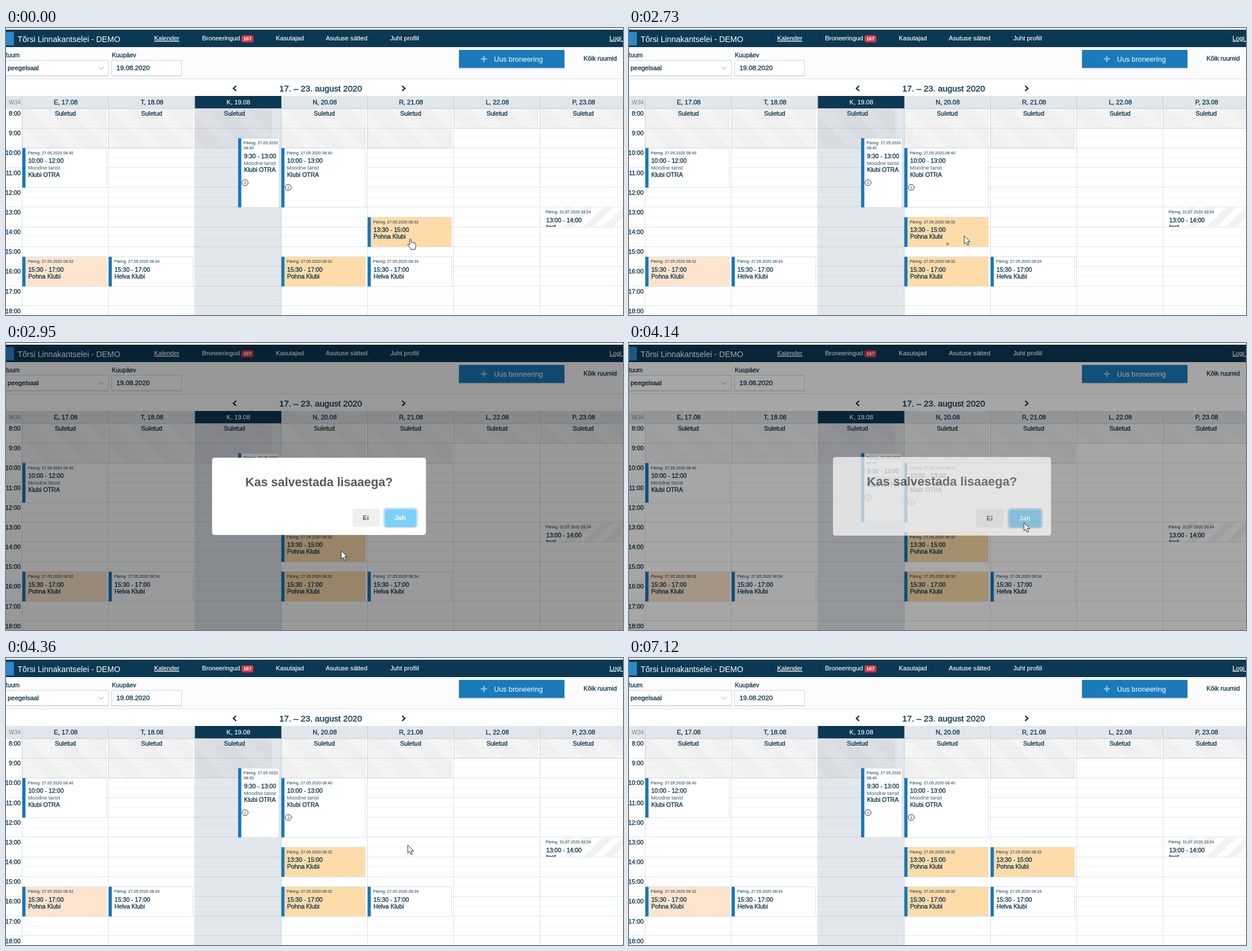
These frames come from a looping animation (1095 by 511 pixels, 7890 ms). An HTML page:

```html
<!DOCTYPE html>
<html lang="et">
<head>
<meta charset="utf-8">
<title>Kalender</title>
<style>
html, body { margin: 0; width: 100%; height: 100%; overflow: hidden; background: #fff; }
svg { display: block; width: 100%; height: 100%; }
text { font-family: "Liberation Sans", Arial, sans-serif; fill: #0c3550; white-space: pre; }
.m { stroke: #0c3550; stroke-width: .35; }
.w { fill: #fff; stroke: #fff; stroke-width: .15; }
.u { text-decoration: underline; }
.mid { text-anchor: middle; }
.end { text-anchor: end; }
.soft { fill: #3d5a6e; }
.b { font-weight: bold; }
</style>
</head>
<body>
<svg id="stage" viewBox="0 0 1095 511" preserveAspectRatio="none"></svg>
<script>
const LOOP = 7890, HOUR = 35.18, TOP = 143.5, COL = 153.2, LEFT = 29;
const BLUE = '#1677bb', ORANGE = '#fddca9';
const colX = i => LEFT + i * COL;
const hourY = h => TOP + (h - 8) * HOUR;

const rect = (x, y, w, h, fill, more = '') =>
  `<rect x="${x}" y="${y}" width="${w}" height="${h}" fill="${fill}" ${more}/>`;
const text = (x, y, size, str, cls = '', more = '') =>
  `<text x="${x}" y="${y}" font-size="${size}" class="${cls}" ${more}>${str}</text>`;
const line = (d, color, width = 1) =>
  `<path d="${d}" fill="none" stroke="${color}" stroke-width="${width}"/>`;

function stripes(id, size, angle, a, b) {
  return `<pattern id="${id}" width="${size}" height="${size}" patternUnits="userSpaceOnUse"
    patternTransform="rotate(${angle})">${rect(0, 0, size, size, a)}${rect(0, 0, size / 2, size, b)}</pattern>`;
}

function topBar() {
  return rect(0, 0, 1095, 3, '#f7f9f6') + rect(0, 3, 1095, 31, '#0b3953') +
    rect(-10, 7, 24, 24, '#2b88c6') +
    text(20.5, 24.5, 14.27, 'Tõrsi Linnakantselei - DEMO', 'w', 'style="stroke:none"') +
    [[263, 'Kalender', 'w u'], [348, 'Broneeringud', 'w'], [479, 'Kasutajad', 'w'],
     [567.5, 'Asutuse sätted', 'w'], [682, 'Juht profiil', 'w'], [1071, 'Logi välja', 'w u']]
      .map(([x, s, c]) => text(x, 22, 11.2, s, c)).join('') +
    rect(418, 13, 21, 12.5, '#dc3545', 'rx="3"') +
    text(428.5, 22.4, 8.6, '167', 'w b mid');
}

function filters() {
  const box = (x, w) => rect(x, 58.5, w, 28, '#e6e8ea') +
    rect(x + .5, 57.5, w - 1, 27, '#fff', 'stroke="#cfd4d8"');
  return rect(0, 34, 1095, 56.5, '#fcfcfc') + rect(0, 90, 1095, 1, '#dce0e4') +
    text(-5, 52, 10.9, 'Ruum', 'm') + text(188, 52, 10.9, 'Kuupäev', 'm') +
    box(-6, 188) + box(187, 125) +
    text(3, 75, 11.4, 'peegelsaal', 'm') + text(196, 75, 11.8, '19.08.2020', 'm') +
    line('M165 69.5l4 4 4-4', '#8296a2') +
    rect(803, 40, 189, 33, '#d9dfe4', 'rx="1"') + rect(804, 39, 187, 32, '#1a7aba') +
    line('M848 49.5v11M842.5 55h11', '#8dc0e2', 2.6) +
    text(866, 60, 12.7, 'Uus broneering', 'w', 'style="stroke:none"') +
    text(1025, 58, 11.2, 'Kõik ruumid', 'm') +
    line('M408.5 103l-5 4.5 5 4.5M703 103l5 4.5-5 4.5', '#0a1c28', 2.1) +
    text(558.5, 112.7, 15.2, '17. – 23. august 2020', 'm mid');
}

function grid() {
  let s = rect(0, 121, 1095, 22.5, '#e1e6ea') + rect(colX(2), TOP, COL, 370, '#e2e7ec');
  for (let i = 0; i < 7; i++) {
    const now = i === 2, h = (i < 5 ? 2 : 1) * HOUR;
    s += rect(colX(i), TOP, now ? 137 : 149, h, now ? 'url(#shutNow)' : 'url(#shut)',
      now ? '' : 'stroke="#e4e4e4"');
  }
  for (let k = 0; k < 22; k++) {
    const y = Math.round(TOP + k * HOUR / 2) - .5;
    s += line(`M${k % 2 ? LEFT : 0} ${y}H1095`, k % 2 ? 'rgba(60,70,80,.06)' : 'rgba(60,70,80,.14)');
  }
  for (let i = 0; i < 7; i++)
    s += line(`M${Math.round(colX(i)) - .5} 121V511`, 'rgba(60,80,95,.17)');
  s += rect(colX(2), 121, COL, 22, '#0b3953');
  ['E, 17.08', 'T, 18.08', 'K, 19.08', 'N, 20.08', 'R, 21.08', 'L, 22.08', 'P, 23.08'].forEach((d, i) => {
    s += text(colX(i) + 77, 136.3, 11.3, d, i === 2 ? 'w mid' : 'm mid');
    s += text(i === 2 ? 405.5 : colX(i) + 76.3, 155.7, 11, 'Suletud', 'm mid');
  });
  s += text(26, 136, 10.2, 'W34', 'end', 'style="fill:#75838d"');
  for (let h = 8; h <= 18; h++) s += text(26, hourY(h) + 12.5, 10.75, h + ':00', 'm end');
  return s;
}

// rows: small request line(s), time span, optional activity, club
function booking(x, from, to, o) {
  const y = hourY(from), h = hourY(to) - y, w = o.w || 149, span = t =>
    Math.floor(t) + (t % 1 ? ':30' : ':00');
  let s = rect(x, y, w, h, o.fill || '#fff', 'stroke="#d9dde0" stroke-width=".8"') +
    rect(x, y, 5.6, h, BLUE), ty = y + 10.7;
  o.at.forEach((a, i) => { s += text(x + 9.7, ty + i * 9, 7.2, a); });
  ty += 15.7 + (o.at.length - 1) * 9;
  s += text(x + 10.4, ty, 10.69, `${span(from)} - ${span(to)}`, 'm');
  if (o.act) s += text(x + 10, ty += 12.2, 9.4, o.act, 'soft');
  s += text(x + 10.4, ty += 12.1, 10.67, o.club, 'm');
  if (o.info) {
    const cx = x + 12.3, cy = ty + 19.4;
    s += `<circle cx="${cx}" cy="${cy}" r="5.4" fill="none" stroke="#26343e"/>` +
      line(`M${cx} ${cy - 1}v4M${cx} ${cy - 3.2}v1.2`, '#26343e');
  }
  return s;
}

function bookings() {
  const early = 'Päring: 27.05.2020 08:40', late = 'Päring: 27.05.2020 08:34', mid = 'Päring: 27.05.2020 08:32';
  const dance = { act: 'Moodne tanst', club: 'Klubi OTRA' };
  const pohna = { at: [mid], club: 'Pohna Klubi', fill: ORANGE };
  const helva = { at: [late], club: 'Helva Klubi' };
  const [x0, x1, , x3, x4, , x6] = Array.from({ length: 7 }, (_, i) => colX(i));
  const yP = hourY(13);
  return booking(x0, 10, 12, { ...dance, at: [early] }) +
    booking(412, 9.5, 13, { ...dance, at: ['Päring: 27.05.2020', '08:40'], w: 72.5, info: true }) +
    booking(x3, 10, 13, { ...dance, at: [early], info: true }) +
    booking(x0, 15.5, 17, { ...pohna, fill: '#fde5cd' }) +
    booking(x3, 15.5, 17, pohna) + booking(x1, 15.5, 17, helva) + booking(x4, 15.5, 17, helva) +
    rect(x6, yP, 160, 34.5, 'url(#draft)') + rect(x6, yP, 42, 34.5, '#fff', 'opacity=".85"') +
    text(957.5, yP + 10.7, 7.2, 'Päring: 31.07.2020 10:24') +
    text(958.7, yP + 26.3, 10.69, '13:00 - 14:00', 'm') +
    `<g clip-path="url(#cut)">${text(958.7, yP + 38.4, 10.67, 'test', 'm')}</g>` +
    `<g id="thu">${booking(x3, 13.5, 15, pohna)}</g><g id="fri">${booking(x4, 13.5, 15, pohna)}</g>` +
    `<g id="grip">${line('M562.8 383.5h5M562.8 385.8h5', '#24465c', .9)}</g>`;
}

function dialog() {
  return `<g id="modal">${rect(362, 203, 387, 140, '#fff', 'rx="4.5"')}` +
    text(555.5, 254.3, 22.1, 'Kas salvestada lisaaega?', 'b mid', 'style="fill:#595959"') +
    rect(616, 295.5, 49, 33, '#efefef', 'rx="4"') +
    text(640, 316, 11.8, 'Ei', 'b mid', 'style="fill:#555"') +
    rect(673, 295, 60, 34, '#fff', 'rx="5" stroke="#b3d3ea" stroke-width="2"') +
    rect(674.5, 296.5, 57, 31.5, '#7cd1f9', 'rx="4" id="yes"') +
    text(702.5, 316, 11.8, 'Jah', 'b w mid') + '</g>';
}

const ink = 'fill="#fff" stroke="#222b33" stroke-width="1" stroke-linejoin="round"';
const stage = document.getElementById('stage');
stage.innerHTML = `<defs>${stripes('shut', 50, -45, '#f4f4f4', '#f0f0f0')}
  ${stripes('shutNow', 50, -45, '#dce0e4', '#d8dce0')}${stripes('draft', 25, 45, '#fff', '#f2f2f2')}
  <clipPath id="cut">${rect(948, 320, 147, 34, '#000')}</clipPath></defs>` +
  rect(0, 0, 1095, 511, '#fff') + topBar() + filters() + grid() + bookings() +
  rect(0, 3, 1095, 508, '#000', 'id="dim"') + dialog() +
  `<g id="pointer"><circle id="glow" r="11" fill="#fbe01e" opacity=".85"/>
  <path id="hand" ${ink} d="M-2.6 1.8q1.3-2.4 2.8 0V7.2q1-1.2 2.6.2 1.7-.9 2.5.6 2.4-.5 2.9 1.6v4.2q0 1.8-1.1 3.3v2.2h-7.8v-2L-5.5 12.4q-1.2-2 .4-2.6 1.2 0 2.5 1.6z"/>
  <path id="arrow" ${ink} d="M0 0V14.5l3.3-3.1 2.5 5.4 2.4-1.1-2.4-5.2h4.6z"/></g>`;

const el = {};
for (const id of ['thu', 'fri', 'grip', 'dim', 'modal', 'yes', 'pointer', 'glow', 'hand', 'arrow'])
  el[id] = document.getElementById(id);

// time, x, y
const moves = [
  [0, 719, 375], [860, 716, 376], [970, 709, 379], [1080, 699, 380], [1200, 687, 380], [1310, 674, 378],
  [1640, 657, 375], [1740, 634, 377], [1850, 615, 375], [1960, 601, 372], [2070, 595, 370],
  [3270, 603, 366], [3380, 625, 354], [3490, 654, 340], [3600, 681, 328], [3710, 696, 322], [3820, 701, 320],
  [4260, 705, 324], [4360, 713, 333], [4480, 717, 356], [4600, 720, 376],
  [5680, 700, 375], [5790, 636, 372], [5900, 562, 368], [6010, 527, 364], [6130, 556, 345],
  [6240, 622, 318], [6350, 684, 297], [6460, 712, 304],
  [6560, 701, 302], [6670, 668, 298], [6790, 632, 294], [6900, 612, 296]
];
// time, shade, dialog scale, dialog opacity
const veil = [
  [0, 0, 1, 0], [2880, .27, 1.04, .9], [2950, .4, .981, 1], [3060, .4, 1, 1],
  [4140, .35, 1, .7], [4260, .1, 1, .22], [4360, 0, 1, 0]
];
const at = (keys, t) => keys.reduce((last, k) => k[0] <= t ? k : last);
const within = (t, a, b) => t >= a && t < b;
const show = (node, on) => node.setAttribute('visibility', on ? 'visible' : 'hidden');

function isHand(t, x, y) {
  if (t < 2730) return true;
  if (t < 4920) return false;
  const inCol = within(x, 489, 638) || within(x, 642, 790);
  return inCol && within(y, 337, 390) || within(x, 489, 638) && y < 319;
}

function draw(t) {
  const [, x, y] = at(moves, t), [, shade, scale, alpha] = at(veil, t);
  const hand = isHand(t, x, y), live = t < 7120;
  show(el.fri, t < 1740 || t >= 4920);
  show(el.thu, t >= 1740);
  el.fri.setAttribute('opacity', within(t, 860, 1740) ? .75 : 1);
  el.thu.setAttribute('opacity', t < 2730 ? .75 : 1);
  show(el.grip, within(t, 2730, 2880));
  el.dim.setAttribute('opacity', shade);
  el.modal.setAttribute('opacity', alpha);
  el.modal.setAttribute('transform', `translate(555.5 273) scale(${scale}) translate(-555.5 -273)`);
  el.yes.setAttribute('fill', within(t, 3930, 4040) ? '#70bce0' : t >= 3710 ? '#78cbf2' : '#7cd1f9');
  el.pointer.setAttribute('transform', `translate(${x} ${y})`);
  show(el.hand, live && hand);
  show(el.arrow, live && !hand);
  show(el.glow, within(t, 330, 2410) || within(t, 3930, 4040));
}

const start = performance.now();
function tick() {
  draw((performance.now() - start) % LOOP);
  requestAnimationFrame(tick);
}
draw(0);
requestAnimationFrame(tick);
</script>
</body>
</html>
```
